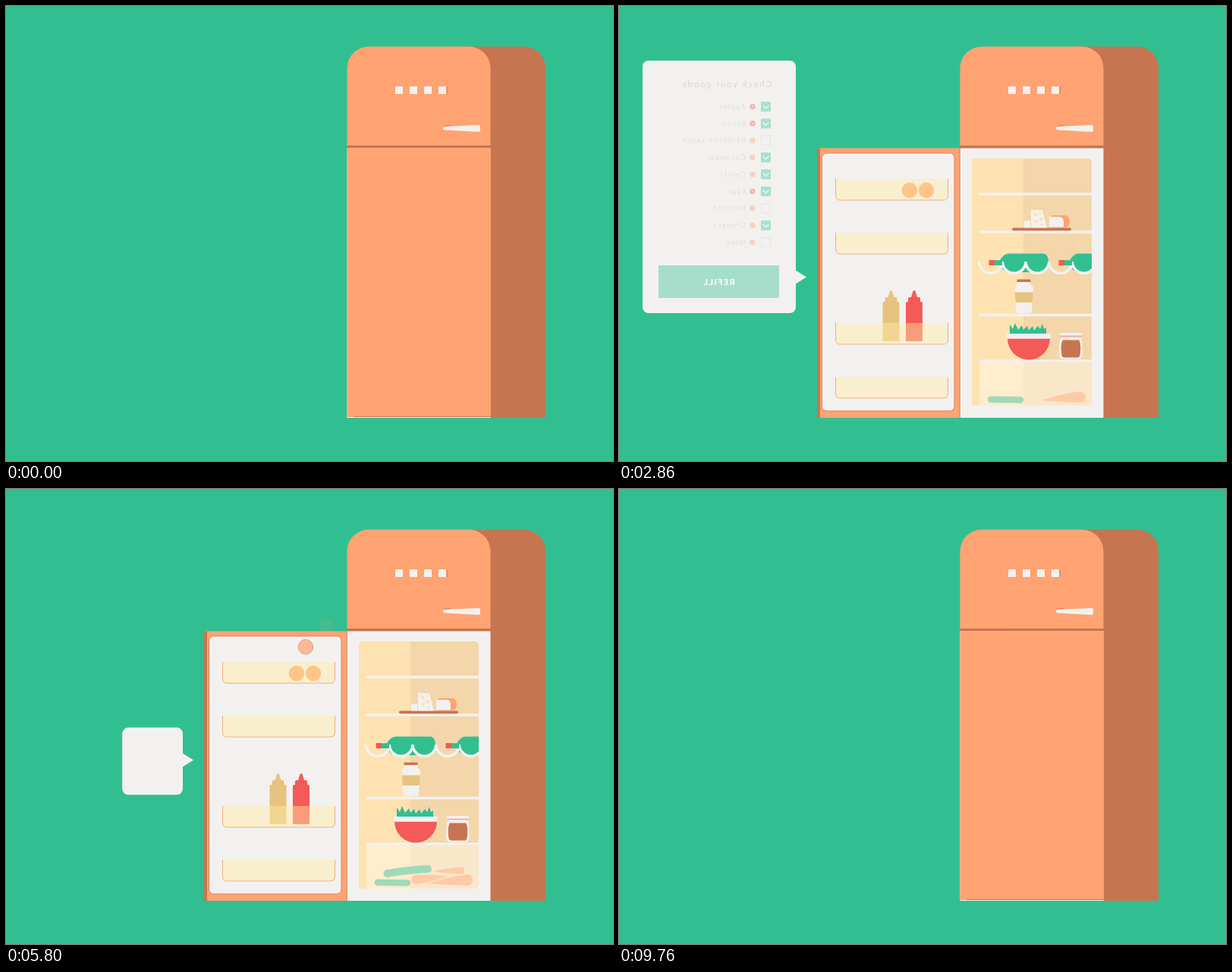
An HTML page that plays this animation: 800 px wide and 600 px high, repeating every 9.8 s.

```html
<!DOCTYPE html>
<html lang="en">
<head>
<meta charset="utf-8">
<title>Fridge refill</title>
<style>
html, body { margin: 0; width: 100%; height: 100%; overflow: hidden; background: #31bf92; }
svg { display: block; width: 100vw; height: 100vh; }
text { font-family: Lato, "Open Sans", sans-serif; }
.head { font-size: 11.5px; letter-spacing: 1.8px; fill: #b2b1b0; }
.row { font-size: 9px; letter-spacing: 1.6px; fill: #c6c4c2; }
.cost { font-size: 10px; letter-spacing: 1px; fill: #bebcba; }
.pick { font-size: 11.5px; font-weight: 900; letter-spacing: 1.6px; fill: #8d8b89; }
.sum { font-size: 14.5px; letter-spacing: 1.2px; fill: #858381; }
.btn { font-size: 11px; font-weight: 900; letter-spacing: 1.3px; fill: #fff; text-anchor: middle; }
.end { text-anchor: end; }
.bold { font-weight: 900; }
</style>
</head>
<body>
<svg viewBox="0 0 800 600">
  <defs>
    <clipPath id="room"><rect x="465" y="201" width="158" height="326" rx="5"/></clipPath>
    <clipPath id="press"><rect x="53" y="342" width="159" height="43" rx="1"/></clipPath>
  </defs>
  <rect width="800" height="600" fill="#31bf92"/>

  <!-- cabinet -->
  <path d="M600 53.5H683a28 28 0 0 1 28 28V543H600Z" fill="#c77550"/>
  <path d="M449.500 186V82a28.500 28.500 0 0 1 28.500-28.500H610a28.500 28.500 0 0 1 28.500 28.500V186Z" fill="#ffa372"/>
  <path d="M513 106h10v10h-10zm19 0h10v10h-10zm19 0h10v10h-10zm19 0h10v10h-10z" fill="#f3f1ef"/>
  <path d="M581.300 106v10" stroke="#c77550" stroke-width=".8"/>
  <path d="M578 159L623 157q2 0 2 2v5q0 2-2 2L578 163.500q-2-.5-2-2.200t2-2.300Z" fill="#f3f1ef"/>
  <path d="M577 158.300l9-.9" stroke="#c77550" stroke-width=".8"/>
  <rect x="449.500" y="187" width="189" height="356" fill="#f3f1ef"/>
  <rect x="449.500" y="184" width="189.500" height="3.500" fill="#c77550"/>

  <!-- inside -->
  <g clip-path="url(#room)">
    <rect x="465" y="201" width="158" height="326" fill="#f3d6aa"/>
    <rect x="465" y="201" width="68" height="326" fill="#ffe2b1"/>
    <rect x="475" y="470" width="148" height="57" fill="#fffaf0" opacity=".45"/>
    <g id="apples"></g>
    <path d="M476 248H623M476 298H623M476 407.500H623M476 468H623" stroke="#f3f1ef" stroke-width="3.700" stroke-linecap="round"/>

    <rect x="518" y="292.500" width="78" height="3.700" rx="1.800" fill="#c77550"/>
    <path d="M534 284.500q0-1.500 2-1.500h6V292.500h-8Z M543 268.500l15 1 6 23H543Z" fill="#f3f1ef"/>
    <g fill="#ffdf9f"><circle cx="549" cy="275" r="2"/><circle cx="555" cy="273" r="1.300"/><circle cx="550" cy="284" r="1.800"/><circle cx="556" cy="281" r="1.900"/><circle cx="557" cy="288" r="1.300"/></g>
    <path d="M570 276H588q6 1 6 8t-6 8H570Z" fill="#ffa372"/>
    <path d="M567 278h15q4 1 4 7v6.500H567Z" fill="#f3f1ef"/>

    <g id="wine"></g>
    <path d="M474.500 337a15 15 0 0 0 30.700 0a15 15 0 0 0 30.800 0a15 15 0 0 0 30.700 0a15 15 0 0 0 30.700 0a15 15 0 0 0 30.700 0" fill="none" stroke="#f3f1ef" stroke-width="3.600"/>
    <g id="necks"></g>

    <rect x="524.500" y="360.500" width="18" height="4" rx="1" fill="#c77550"/>
    <path d="M525 364h17v3q4 2 4 6l-2 29q0 3-3 3H526.500q-3 0-3-3l-2-29q0-4 3.500-6Z" fill="#f3f1ef"/>
    <path d="M521.800 377.500h24l-1 13.500H522.700Z" fill="#e6c37f"/>

    <path d="M515 433V420l4 6 3-8 4 9 5-6 2 6 5-5 2 6 5-6 2 6 5-6 3 4 3-7 2 7 3-2V433Z" fill="#31bf92"/>
    <path d="M512 438h56a28 28.500 0 0 1-56 0Z" fill="#f45a58"/>
    <rect x="511" y="432" width="58" height="6.700" rx="1" fill="#f3f1ef"/>

    <rect x="580.500" y="431" width="29.500" height="6.500" rx="2" fill="#f3f1ef"/>
    <path d="M581 435.500h29" stroke="#f4a08b" stroke-width="1.700"/>
    <path d="M582 437.500h27q2 8 1.500 23-.5 5-5 5H585.500q-5 0-5.300-5-.5-15 1.800-23Z" fill="#f3f1ef"/>
    <path d="M584.500 440.500h22q3 8 1 20-.5 3-3 3H587q-3 0-3.500-3-2-12 1-20Z" fill="#c77550"/>

    <path d="M490 518.800L529 519.500" stroke="#9fdab8" stroke-width="8.500" stroke-linecap="round"/>
    <g id="veg"></g>
    <path d="M557 520Q584 511 607 508.500a7.300 7.300 0 0 1 2 14.500Q584 522.500 557 520Z" fill="#ffcaa7"/>
    <g id="bacon"></g>
  </g>

  <!-- door -->
  <g id="inner">
    <rect x="261" y="187.500" width="188.500" height="355.500" fill="#ffa372"/>
    <path d="M449 187.500V543" stroke="#d98a60" stroke-width=".8"/>
    <rect x="267.500" y="194" width="174.500" height="340" rx="6" fill="#f3f1f0" stroke="#d9835a"/>
    <g id="stock"></g>
    <g id="racks"></g>
  </g>
  <rect id="outer" x="449.500" y="187.500" height="354.500" fill="#ffa372"/>
  <rect id="sill" x="458" y="541" height="1" fill="#c77550"/>
  <rect id="edge" y="187.500" height="355.500" fill="#c77550"/>

  <!-- card -->
  <g id="card" fill="#f3f1ef">
    <rect id="sheet"/>
    <path id="tip" d="M232 348L247 357.500L232 367Z"/>
    <g fill="none" stroke="#31bf92" stroke-width="2.300">
      <path id="ring" d="M170 358a22 22 0 0 0 44 0a22 22 0 0 0-44 0" pathLength="360" stroke-dasharray="0 400"/>
      <path id="tick" d="M183 351L196 364.500L205 354" pathLength="100" stroke-dasharray="0 200"/>
    </g>
    <g transform="matrix(-1 0 0 1 264 0)"><g id="list"></g><g id="shop"></g></g>
  </g>
</svg>
<script>
const LOOP = 9800;
const $ = id => document.getElementById(id);
const set = (id, attrs) => { for (const k in attrs) $(id).setAttribute(k, attrs[k]); };
const clamp = v => Math.max(0, Math.min(1, v));
const span = (t, a, b) => clamp((t - a) / (b - a));
const smooth = u => u * u * (3 - 2 * u);

// steps: [time, values...], eased between neighbours
function track(steps, t, ease = smooth) {
  let i = 1;
  while (i < steps.length - 1 && t > steps[i][0]) i++;
  const a = steps[i - 1], b = steps[i], u = ease(span(t, a[0], b[0]));
  return a.slice(1).map((v, k) => v + (b[k + 1] - v) * u);
}

// falling goods
const drops = [];
function drop(parent, start, markup, height = 60) {
  const g = document.createElementNS("http://www.w3.org/2000/svg", "g");
  g.innerHTML = markup;
  $(parent).append(g);
  drops.push({ g, start, height });
}
const ball = (x, y, r, fill, extra = "") => `<circle cx="${x}" cy="${y}" r="${r}" fill="${fill}" ${extra}/>`;

[[575, 236], [597, 236], [619, 236], [608.5, 217]].forEach(([x, y], i) =>
  drop("apples", 5900 + i * 100, ball(x, y, 10.2, "#f45a58")));
drop("veg", 5160, '<path d="M539 509.500Q556 507.500 583 510.500Q566 517 540 521a5.800 5.800 0 0 1-1-11.500Z" fill="#ffcaa7"/>', 80);
drop("veg", 5300, '<path d="M563 504Q583 499.500 599 498.500a4.600 4.600 0 0 1 1 9.500Q583 507.500 563 504Z" fill="#ffcaa7"/>', 80);
drop("veg", 5480, '<path d="M502.500 507.500Q530 502.500 556 501.500" fill="none" stroke="#9fdab8" stroke-width="10" stroke-linecap="round"/>');
drop("bacon", 7740, `<rect x="599" y="392.500" width="18.500" height="12" rx="2" fill="#c77550"/>
  <rect x="568" y="392" width="34.500" height="13" rx="4" fill="#f3f1ef"/>
  <rect x="570" y="394.500" width="30.500" height="8.300" rx="2" fill="#f45a58"/>`);

// goods on the door
const bottle = (x, fill) => `<path d="M${x - 11} 442V392q0-2 2-2h1v-4q0-2 2-2h2l2.500-8q1.500-2 3 0l2.500 8h2q2 0 2 2v4h1q2 0 2 2V442Z" fill="${fill}"/>`;
const rim = 'stroke="#c77550" stroke-width=".8"';
$("stock").innerHTML = `<g class="near" data-d="8" id="oranges">${ball(383, 243, 10.3, "#ffa372")}${ball(405, 243, 10.3, "#ffa372")}</g>
  <g class="near" data-d="17" id="eggs"></g>
  <g class="near" data-d="15">${bottle(358.5, "#e6c37f")}${bottle(389, "#f45a58")}</g>`;
drop("oranges", 5660, ball(395, 224.5, 9.8, "#ffa372", rim));
drop("oranges", 5780, ball(422.5, 231.5, 9.8, "#ffa372", rim));
[419, 405, 391, 377, 363].forEach((x, i) =>
  drop("eggs", 6360 + i * 120, `<path d="M${x} 292.500c3 0 5.500 4 5.500 8a5.500 6.500 0 0 1-11 0c0-4 2.500-8 5.500-8Z" fill="#efd3a1"/>`));
drop("eggs", 7120, `<path d="M306 276h12l1 11q1 10 5 17v14q0 4-4 4H304q-4 0-4-4V304q4-7 5-17Z" fill="#ffe2ab"/>
  <path d="M306.500 294.500h11q1 6 4 11l1 10q0 4-4 4H305.500q-4 0-4-4l1-10q3-5 4-11Z" fill="#b5694a"/>
  <path d="M303 270.500h17l-3 6H306Z" fill="#f45a58"/>`);
$("racks").innerHTML = [228, 299, 418, 489].map(y =>
  `<path d="M285.500 ${y}v22q0 6 6 6h136q6 0 6-6v-22" fill="#ffeaa7" fill-opacity=".45"/>
   <path d="M285.500 ${y}v22q0 6 6 6h136q6 0 6-6v-22" fill="none" stroke="#ecb083"/>`).join("");

// wine
const body = x => `<path d="M${x} 335.500h14q5-9 12-9h46q6 1 6 12t-6 12.500h-46q-7 0-12-9h-14Z" fill="#31bf92"/>`;
$("wine").innerHTML = body(488) + body(580);
$("necks").innerHTML = [488, 580].map(x =>
  `<rect x="${x}" y="335.500" width="17" height="6.500" fill="#31bf92"/><rect x="${x - .5}" y="335" width="7.500" height="7" rx="1" fill="#f45a58"/>`).join("");

// card pages
const label = (cls, x, y, s) => `<text class="${cls}" x="${x}" y="${y}">${s}</text>`;
const button = (id, s) => `<g clip-path="url(#press)"><rect id="${id}Btn" x="53" y="342" width="159" height="43"/>
  <circle id="${id}Wave" cx="159" cy="364" fill="#fff" opacity=".25"/></g>${label("btn", 132.6, 367.5, s)}`;

const goods = ["Apples", "Bacon", "Barbecue sauce", "Cucumber", "Carots", "Eggs", "Mustard", "Oranges", "Wine"];
const missing = [2, 6, 8], reds = [0, 1, 5];
$("list").innerHTML = label("head", 63, 107, "Check your goods") + goods.map((name, i) => {
  const y = 132.7 + i * 22.35;
  const box = missing.includes(i)
    ? `<rect x="64.500" y="${y - 6}" width="12" height="12" fill="none" stroke="#d3d1cf"/>`
    : `<rect x="64" y="${y - 6.5}" width="13" height="13" rx="1" fill="#2fcb9b"/><path d="M66.500 ${y - 1.5}l4 3.500 4-3.500" fill="none" stroke="#fff" stroke-width="1.300"/>`;
  const tone = reds.includes(i) ? "#f45a58" : "#ffa372";
  return box + ball(88, y, 3.7, tone) + ball(88, y, 1, "#fbb9a0") + label("row", 97, y + 3, name);
}).join("") + button("list", "REFILL");

const prices = [["Apples", "2.41", 170], ["Bacon", "3.20", 187], ["Carots", "0.99", 203], ["Cucumber", "0.80", 219],
  ["Eggs", "2.00", 234.5], ["Oranges", "1.75", 251], ["Delivery", "5.00", 284]];
$("shop").innerHTML = label("head", 55, 107, "Select your shop")
  + '<rect x="57.500" y="118.500" width="141.500" height="27.500" rx="1" fill="none" stroke="#cbc9c7"/>'
  + '<path d="M180 131l4 4 4-4" fill="none" stroke="#c6c4c2"/>'
  + label("pick", 65, 136, "Vrndlop")
  + prices.map(([name, cost, y]) => label("row", 57, y + 3, name) + label("cost end", 204.5, y + 3.5, cost)).join("")
  + '<path d="M57 267.500H203" stroke="#cbc9c7"/>'
  + label("sum bold", 57, 311, "TOTAL") + label("sum end", 204, 311, "16,15") + button("shop", "CHECKOUT");

const near = [...document.querySelectorAll(".near")];
const size = [[960, 0, 0], [1000, 56, 68], [1140, 215, 346], [1240, 208, 339], [1360, 199, 330], [1500, 203, 334], [1640, 202, 333],
  [5380, 202, 333], [5500, 215, 345], [5760, 79, 88], [5900, 83, 92], [8700, 83, 92], [9040, 0, 0]];
const load = [[5880, 0], [6100, 60], [6720, 232], [7100, 297], [7600, 360]];

function drawDoor(t) {
  const turn = t < 5000 ? 1 - (1 - span(t, 0, 1400)) ** 3 : 1 - span(t, 7900, 9760) ** 3;
  const cos = Math.cos(turn * Math.PI), sin = Math.sin(turn * Math.PI);
  const open = Math.max(0, -cos), shut = Math.max(0, cos);
  set("inner", { transform: `translate(449.5 0) scale(${open} 1) translate(-449.5 0)`, visibility: open > .01 ? "visible" : "hidden" });
  near.forEach(g => g.setAttribute("transform", `translate(${g.dataset.d * sin / Math.max(open, .1)} 0)`));
  set("outer", { width: 189.5 * shut });
  set("sill", { width: 180 * shut });
  set("edge", { x: 449.5 + (cos < 0 ? 188.5 : 189.5) * cos, width: 4 * open + 8 * sin });
  return open;
}

function drawPage(id, t, [inA, inB, hover, click, outA, outB]) {
  const shown = Math.min(span(t, inA, inB), 1 - span(t, outA, outB));
  set(id, { opacity: shown });
  const h = span(t, hover, hover + 180);
  set(id + "Btn", { fill: `rgb(${49 - 7 * h},${193 - 10 * h},${148 - 9 * h})` });
  set(id + "Wave", { r: Math.max(0, t - click) * .65 });
}

function draw(t) {
  const open = drawDoor(t);
  for (const { g, start, height } of drops) {
    const u = span(t, start, start + 400);
    g.setAttribute("transform", `translate(0 ${-height * (1 - u) ** 3})`);
    g.setAttribute("opacity", clamp(u * 2));
  }
  const [w, h] = track(size, t);
  const bottom = Math.min(405, 357 + h * .522);
  const grow = clamp(w / 56);
  const shift = t > 7900 ? (1 - open) * 113 : 0;
  set("card", { transform: `translate(${shift} 0)`, visibility: w > 0 ? "visible" : "hidden" });
  set("sheet", { x: 233 - w, y: bottom - h, width: w, height: h, rx: Math.min(8, w / 2) });
  set("tip", { transform: `translate(233 357.5) scale(${grow}) translate(-233 -357.5)` });
  const icon = t > 8700 ? clamp((w - 40) / 43) : 1;
  const arc = track(load, t, u => u)[0], mark = 100 * smooth(span(t, 7640, 7960));
  set("ring", { "stroke-dasharray": `${arc} 400`, opacity: arc ? icon : 0 });
  set("tick", { "stroke-dasharray": `${mark} 200`, opacity: mark ? icon : 0 });
  drawPage("list", t, [2640, 3200, 3680, 4040, 4070, 4340]);
  drawPage("shop", t, [4320, 4560, 4760, 5120, 5220, 5390]);
}

const begin = performance.now();
function frame() {
  draw((performance.now() - begin) % LOOP);
  requestAnimationFrame(frame);
}
frame();
</script>
</body>
</html>
```
